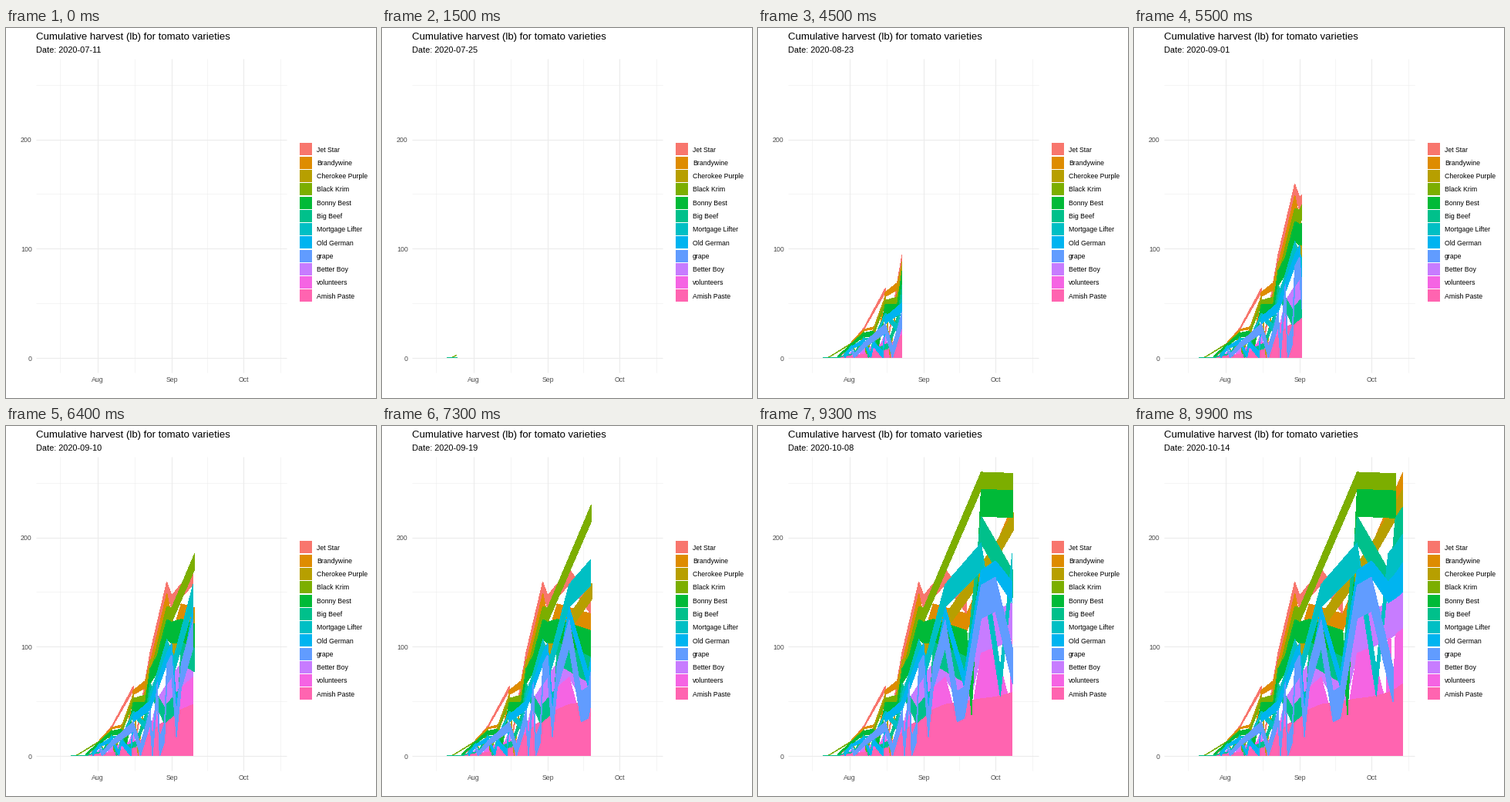
Animation, 480 px wide and 480 px high, one loop 10000 ms. Source, as a matplotlib script:

```python
import numpy as np
import matplotlib.pyplot as plt
from matplotlib.animation import FuncAnimation
from matplotlib.patches import Polygon, Rectangle

plt.rcParams["font.family"] = "Liberation Sans"

SIZE, DPI = 480, 72
FRAMES, DAYS = 100, 95
START = np.datetime64("2020-07-11")
BUSY_DAYS = {22, 27, 31, 36, 41, 43, 46}

rng = np.random.default_rng(4)


def px(day):
    return 53.3 + 3.107 * np.asarray(day, float)


def py(pounds):
    return 428 - 1.4175 * np.asarray(pounds, float)


class Crop:
    """One variety: an S-shaped yield with an optional last surge."""

    def __init__(self, name, color, total, mid, width, picks, surge=0):
        self.name, self.color = name, color
        self.total, self.mid, self.width, self.surge = total, mid, width, surge
        first = rng.integers(12, 17)
        early = {d for d in range(first, 48)
                 if rng.random() < (0.85 if d in BUSY_DAYS else 0.14)}
        self.picks = sorted(early | set(picks))

    def weight(self, day):
        day = np.asarray(day, float)
        curve = 1 / (1 + np.exp((self.mid - day) / self.width))
        late = np.clip((day - 50) / 45, 0, 1) ** 6
        return self.total * ((1 - self.surge) * curve + self.surge * late)

    def stack(self, below):
        """Stand on the crops below that were picked on the same day."""
        self.days = np.array(self.picks, float)
        self.base = np.array([sum(c.weight(d) for c in below if d in c.picks)
                              for d in self.picks], float)
        self.top = self.base + self.weight(self.days)
        self.keys = np.rint(self.days * (FRAMES - 1) / DAYS)

    def outline(self, frame):
        """Area outline, cut at the point it has reached."""
        seen = self.keys < frame
        day, top, base = (np.append(v[seen], np.interp(frame, self.keys, v))
                          for v in (self.days, self.top, self.base))
        x = px(day)
        return np.column_stack([np.append(x, x[::-1]),
                                np.append(py(top), py(base)[::-1])])


# From the top of the stack to the bottom: total lb, half-way day, spread, pick days.
crops = [
    Crop("Jet Star", "#F8766D", 15, 44, 7, [50, 52, 61, 70]),
    Crop("Brandywine", "#DE8C00", 15.6, 43, 6, [50, 53, 56, 70, 95]),
    Crop("Cherokee Purple", "#B79F00", 15.7, 43, 6, [53, 82, 95]),
    Crop("Black Krim", "#7CAE00", 15.8, 43, 6, [50, 52, 76, 92]),
    Crop("Bonny Best", "#00BA38", 24.9, 42, 8, [50, 52, 56, 70, 72, 76, 92]),
    Crop("Big Beef", "#00C08B", 25, 47, 7, [10, 49, 55, 56, 70, 76, 90, 92, 95]),
    Crop("Mortgage Lifter", "#00BFC4", 26.3, 51, 8, [50, 53, 61, 76, 84, 89, 92, 95]),
    Crop("Old German", "#00B4F0", 26.7, 38, 10,
         [50, 52, 54, 61, 69, 76, 82, 89, 92, 95], surge=0.5),
    Crop("grape", "#619CFF", 32.4, 47, 11,
         [44, 49, 50, 52, 54, 56, 61, 66, 69, 76, 82, 91]),
    Crop("Better Boy", "#C77CFF", 34, 48, 10, [50, 52, 53, 61, 70, 76, 82, 89, 90, 92, 95]),
    Crop("volunteers", "#F564E3", 53, 62, 11,
         [49, 50, 52, 53, 54, 56, 61, 66, 69, 70, 72, 76, 82, 88, 89, 90, 91, 92, 95]),
    Crop("Amish Paste", "#FF64B0", 65.7, 46, 7,
         [50, 52, 53, 55, 56, 61, 76, 82, 84, 89, 90, 92, 95], surge=0.2),
]
for i, crop in enumerate(crops):
    crop.stack(crops[i + 1:])

fig = plt.figure(figsize=(SIZE / DPI, SIZE / DPI), dpi=DPI, facecolor="white")
ax = fig.add_axes([0, 0, 1, 1])
ax.set(xlim=(0, SIZE), ylim=(SIZE, 0))
ax.axis("off")


def label(x, y, text, size=8.8, color="black", ha="left"):
    return ax.text(x, y, text, fontsize=size, color=color, ha=ha, va="baseline")


def grid(days, pounds, width):
    style = dict(color="#EBEBEB", lw=width, zorder=0, solid_capstyle="butt")
    for x in px(days):
        ax.plot([x, x], [40, 447], **style)
    for y in py(pounds):
        ax.plot([39, 364], [y, y], **style)


months = {"Aug": 21, "Sep": 52, "Oct": 82}
grid([5.5, 36.5, 67, 97.5], [50, 150, 250], 0.53)
grid(list(months.values()), [0, 100, 200], 1.07)

for name, day in months.items():
    label(px(day) + 0.5, 459, name, color="#4D4D4D", ha="center")
for lb in (0, 100, 200):
    label(33.7, py(lb) + 3.5, str(lb), color="#4D4D4D", ha="right")

label(39, 15, "Cumulative harvest (lb) for tomato varieties", 13.2)
date = label(39, 32, "", 11)

for i, crop in enumerate(crops):
    y = 157.4 + 17.28 * i
    ax.add_patch(Rectangle((381, y - 8), 16, 16, fc=crop.color, lw=0))
    label(403, y + 3.2, crop.name)

# Areas are painted in text order of their numbers: 1, 10, 11, 12, 2, ...
for z, i in enumerate(sorted(range(len(crops)), key=lambda n: str(n + 1))):
    crops[i].area = ax.add_patch(
        Polygon(np.zeros((3, 2)), fc=crops[i].color, lw=0,
                antialiased=False, zorder=2 + z / 100))


def draw(frame):
    day = frame * DAYS / (FRAMES - 1)
    date.set_text(f"Date: {START + int(day + 1e-9)}")
    for crop in crops:
        started = bool(frame > crop.keys[0])
        crop.area.set_visible(started)
        if started:
            crop.area.set_xy(crop.outline(frame))
    return [date] + [crop.area for crop in crops]


anim = FuncAnimation(fig, draw, frames=FRAMES, interval=100,
                     repeat=True, repeat_delay=0, blit=False)
plt.show()
```
